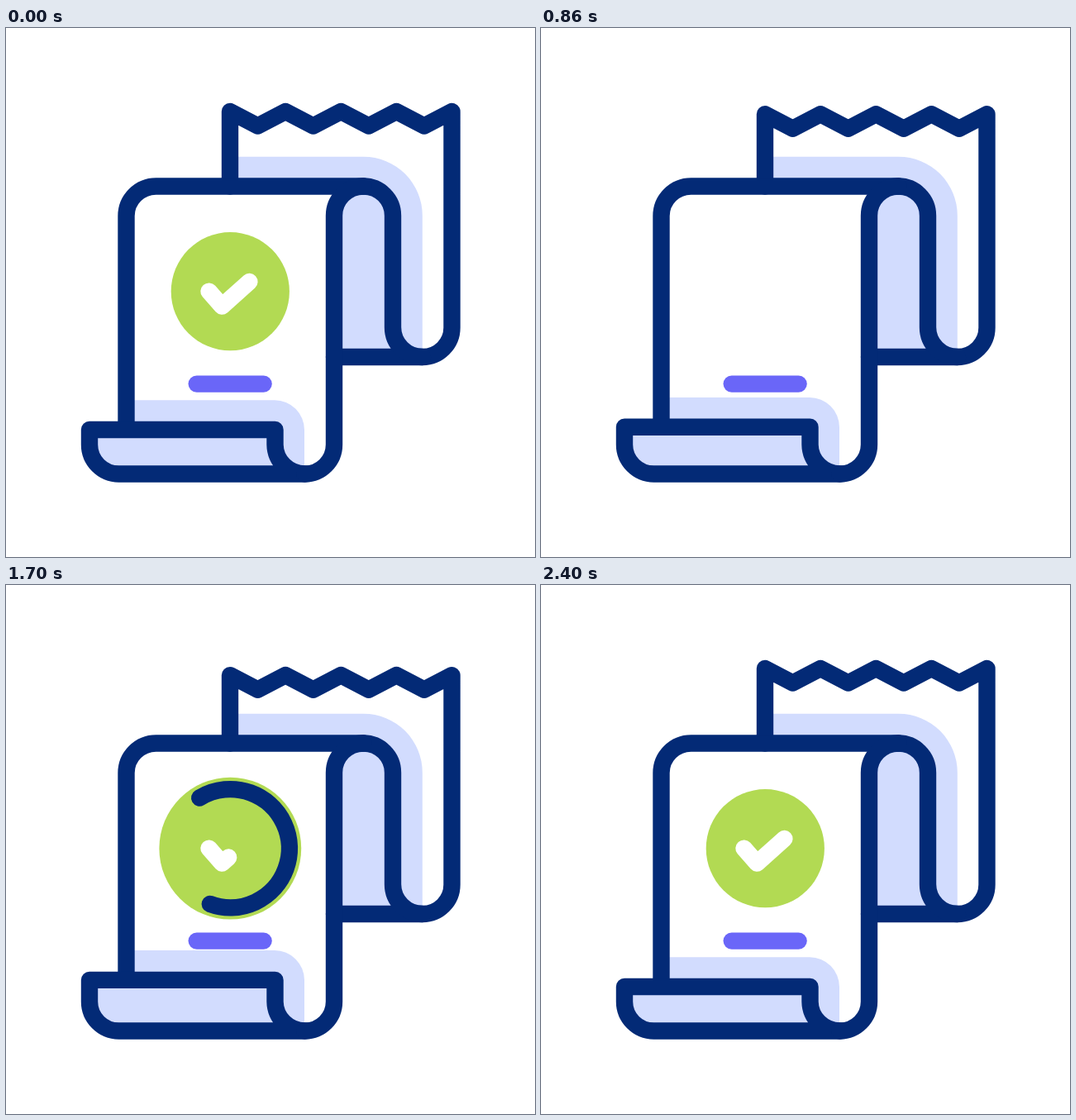
Animation of 640x640 px, one loop 2420 ms. Source, as an HTML page with a canvas:

```html
<!DOCTYPE html>
<html lang="en">
<head>
<meta charset="utf-8">
<style>
  html, body { margin: 0; height: 100%; overflow: hidden; background: #fff; }
  canvas { display: block; }
</style>
</head>
<body>
<canvas id="stage" width="640" height="640"></canvas>
<script>
const ctx = document.getElementById('stage').getContext('2d');
const NAVY = '#032a76', PALE = '#d2dcfe', GREEN = '#b2da53', PURPLE = '#6a66f8';
const CX = 271.3, CY = 318.7, RADIUS = 71.6;
const LOOP = 2420, TICK = 20;

const clamp = x => Math.min(1, Math.max(0, x));
const smooth = x => x * x * (3 - 2 * x);
const easeOut = x => 1 - (1 - x) ** 2;
const rad = deg => deg * Math.PI / 180;

// Eased value between [time, value] keys.
function track(t, keys) {
  let value = keys[0][1];
  for (let i = 1; i < keys.length; i++) {
    const [a, from] = keys[i - 1], [b, to] = keys[i];
    if (t >= a) value = from + (to - from) * smooth(clamp((t - a) / (b - a)));
  }
  return value;
}

function fill(d, color) {
  ctx.fillStyle = color;
  ctx.fill(new Path2D(d));
}

function stroke(d, color = NAVY) {
  ctx.strokeStyle = color;
  ctx.stroke(new Path2D(d));
}

function drawBackPaper(shift) {
  const top = 101 + shift;
  let zigzag = `M271 ${top}`;
  for (let i = 1; i <= 8; i++) zigzag += `L${271 + i * 33.56} ${top + (i % 2) * 17.5}`;

  fill('M271 155.7H432.5A71.3 71.3 0 0 1 503.8 227V398A36 36 0 0 1 468 362V227A35.5 35.5 0 0 0 432.5 191.5H271Z', PALE);
  fill(zigzag + 'V60H271Z', '#fff');
  fill('M397 398V227A35.5 35.5 0 0 1 468 227V362A36 36 0 0 0 504 398Z', PALE);
  stroke(`M271 191.5V${top}` + zigzag.replace('M', 'L') + 'V362.5A35.5 35.5 0 0 1 504 398H397');
  stroke('M432.5 191.5A35.5 35.5 0 0 1 468 227V362A36 36 0 0 0 504 398');
}

function drawFrontPaper(shift) {
  const edge = 486 - shift;
  fill(`M145.5 ${edge - 35.8}H325a36 36 0 0 1 36 36V539.5A36 36 0 0 1 325.5 504V${edge}H145.5Z`, PALE);
  stroke('M230.7 430.6H311.6', PURPLE);
  stroke(`M432.5 191.5H181.5A36 36 0 0 0 145.5 227.5V${edge}`);

  const roll = `M361.5 539.5H136.5A35.5 35.5 0 0 1 101 504V${edge}H325.5V504A36 36 0 0 0 361.5 539.5Z`;
  fill(roll, PALE);
  stroke(roll);
  stroke('M432.5 191.5A35.5 35.5 0 0 0 397 227V504A35.5 35.5 0 0 1 361.5 539.5');
}

function drawBadge(t) {
  const scale = track(t, [[0, 1], [10, 1.2], [34, 0], [61, 0], [85, 1.2], [95, 1]]);
  ctx.fillStyle = GREEN;
  ctx.beginPath();
  ctx.arc(CX, CY, RADIUS * scale, 0, 2 * Math.PI);
  ctx.fill();

  const tick = track(t, [[0, 1], [20, 0], [75, 0], [95, 1]]);
  if (tick > 0) {
    ctx.setLineDash([68.6 * tick, 200]);
    stroke('M245.5 318.6L261.3 336.6L294.4 307', '#fff');
    ctx.setLineDash([]);
  }

  const head = easeOut(clamp((t - 53.5) / 45.5));
  const tail = track(t, [[79, 0], [109, 1]]);
  if (head > tail) {
    ctx.strokeStyle = NAVY;
    ctx.beginPath();
    ctx.arc(CX, CY, RADIUS, rad(140.6 - 289 * tail), rad(140.6 - 289 * head), true);
    ctx.stroke();
  }
}

function draw(now) {
  const t = now % LOOP / TICK;
  const phase = Math.min(t, 120) % 40 / 20;
  const shift = 51 * smooth(phase < 1 ? phase : 2 - phase);

  ctx.fillStyle = '#fff';
  ctx.fillRect(0, 0, 640, 640);
  ctx.lineWidth = 20.4;
  ctx.lineCap = ctx.lineJoin = 'round';
  drawBackPaper(shift);
  drawFrontPaper(shift);
  drawBadge(t);
  requestAnimationFrame(() => draw(performance.now()));
}

draw(0);
</script>
</body>
</html>
```
